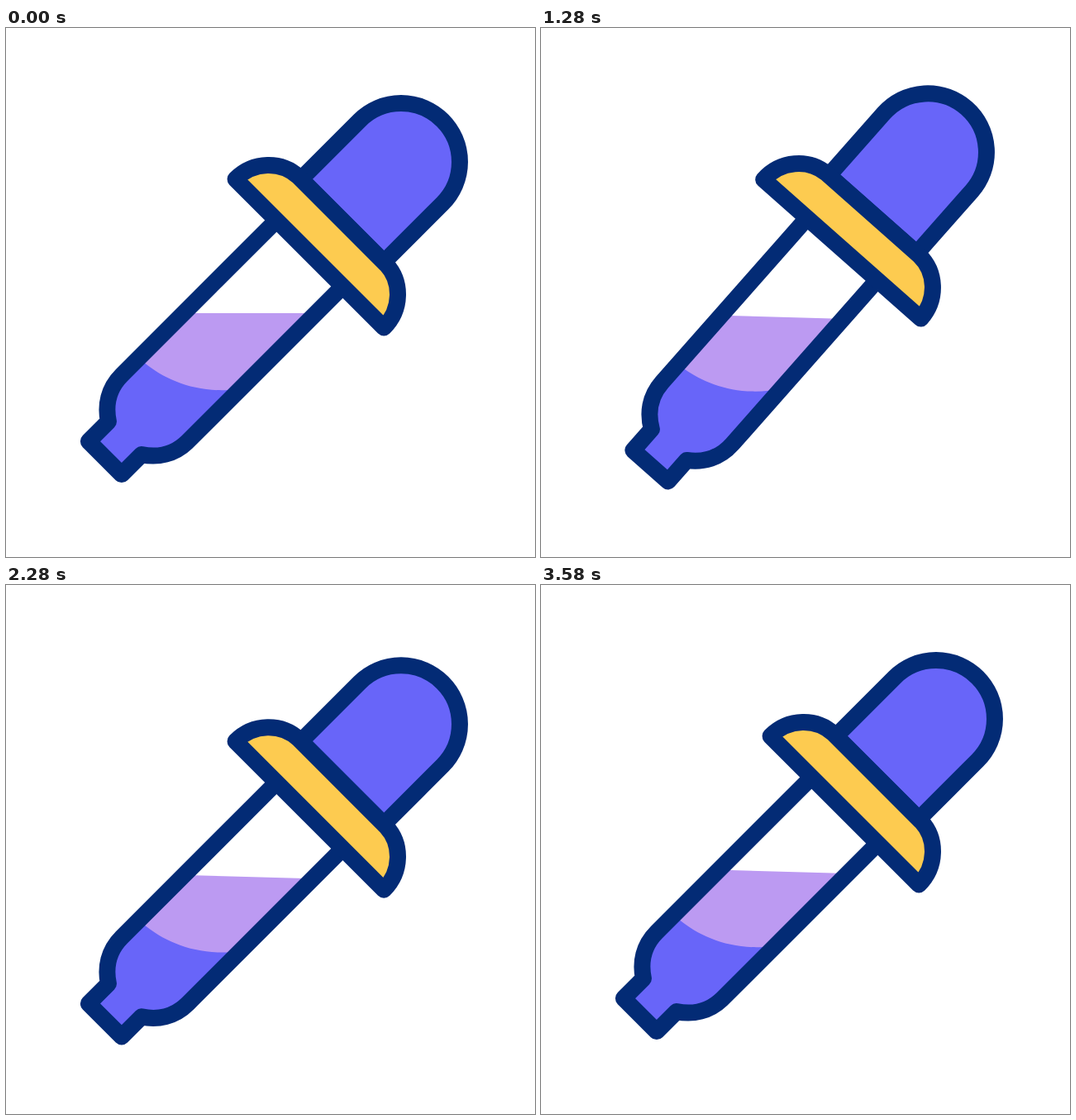
Write an HTML page that moves like this. It is 640 px wide and 640 px high and loops after 3600 ms.

```html
<!DOCTYPE html>
<html>
<head>
<meta charset="utf-8">
<style>
  html, body { margin: 0; height: 100%; overflow: hidden; background: #fff; }
  svg { display: block; width: 100%; height: 100%; }
  .line { stroke: #032b75; stroke-width: 20; stroke-linejoin: round; stroke-linecap: round; }
</style>
</head>
<body>
<svg viewBox="0 0 640 640">
  <defs>
    <path id="tube" d="M-56.6-66V198C-56.6 221-45 238-28.3 249V283H28.3V249C45 238 56.6 221 56.6 198V-66"/>
    <clipPath id="inside"><use href="#tube"/></clipPath>
  </defs>
  <!-- Drawn upright around its own axis, then leaned over. -->
  <g id="dropper">
    <g clip-path="url(#inside)">
      <path id="liquid" fill="#bc9af2" d="M-200 0H300V400H-200Z"/>
      <path fill="#6865f9" d="M-60 168H-47C-18 165 18 152 47 120H60V300H-60Z"/>
    </g>
    <use href="#tube" class="line" fill="none"/>
    <path id="bulb" class="line" fill="#6865f9"/>
    <path class="line" fill="#fdcb50" d="M-127-67C-127-98-103-122-75-123H75C103-122 127-98 127-67Z"/>
  </g>
</svg>
<script>
const LOOP = 3600;
const dropper = document.getElementById('dropper');
const bulb = document.getElementById('bulb');
const liquid = document.getElementById('liquid');

// Eases from 0 to 1 between two times.
function ramp(t, from, to) {
  const u = Math.min(1, Math.max(0, (t - from) / (to - from)));
  return u * u * (3 - 2 * u);
}

const pulse = (t, start, full, release, end) => ramp(t, start, full) - ramp(t, release, end);

// A round cap on two walls; pressing shrinks the cap and pulls the walls in.
function bulbPath(press) {
  const r = 71 - 12 * press;
  const half = (90 + 26 * press) * Math.PI / 180;
  const capX = 2.8 * press, capY = -223.4 - 11.4 * press;
  const dx = r * Math.sin(half), y = capY - r * Math.cos(half);
  const low = 71 - 12 * press, high = 71 - 27 * press;
  return `M-71-123C${-low}-148 ${-high}-182 ${capX - dx} ${y}` +
    `A${r} ${r} 0 1 1 ${capX + dx} ${y}C${high + capX}-182 ${low}-148 71-123Z`;
}

function draw(t) {
  const lift = 24 * pulse(t, 0, 600, 2800, 3450) - 36 * pulse(t, 720, 1570, 1750, 2800);
  const angle = 5 * (pulse(t, 750, 1080, 1080, 1640) + pulse(t, 2750, 3200, 3200, 3580));
  const press = pulse(t, 350, 750, 800, 1250) + pulse(t, 2350, 2750, 2800, 3290);
  const slope = t < 780 ? 0 : 1.6 * (1 - press) ** 4;

  dropper.setAttribute('transform', `translate(320 ${320 + lift}) rotate(${45 - angle})`);
  bulb.setAttribute('d', bulbPath(press));
  liquid.setAttribute('transform', `translate(-46 ${81.3 + 42.4 * press}) rotate(${angle + slope - 45})`);
}

const start = performance.now();
function tick() {
  draw((performance.now() - start) % LOOP);
  requestAnimationFrame(tick);
}
tick();
</script>
</body>
</html>
```
